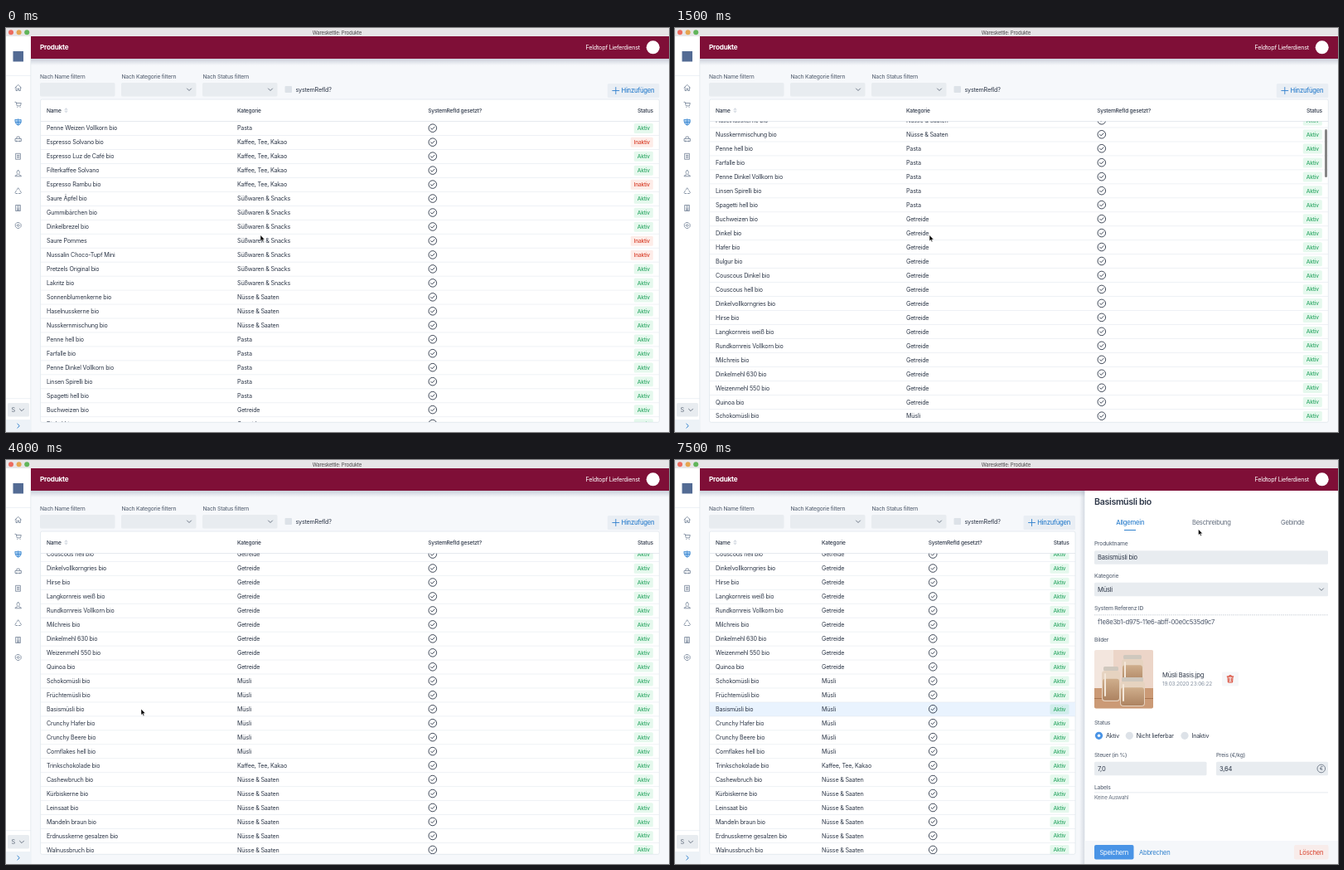
An HTML page that plays this animation: 800 px wide and 487 px high, repeating every 8000 ms.

```html
<!DOCTYPE html>
<html lang="de">
<head>
<meta charset="utf-8">
<title>Produkte</title>
<style>
html, body { margin: 0; width: 100%; height: 100%; overflow: hidden; background: #f6f8fb; }
svg { display: block; }
text { font-family: Inter, "Open Sans", sans-serif; letter-spacing: -.03em; white-space: pre; }
</style>
</head>
<body>
<svg id="stage" width="800" height="487" viewBox="0 0 800 487"></svg>
<script>
const INK = '#2d3748', GREY = '#606b7b', BLUE = '#3182ce', FIELD = '#e8ecf0', RED = '#d8402c';
const PITCH = 16.97, FIRST = 120.9, SELECTED = 36;

const groups = [
  ['Pasta', 'Penne Weizen Vollkorn bio'],
  ['Kaffee, Tee, Kakao', 'Espresso Solvano bio|Espresso Luz de Café bio|Filterkaffee Solvano|Espresso Rambu bio'],
  ['Süßwaren & Snacks', 'Saure Äpfel bio|Gummibärchen bio|Dinkelbrezel bio|Saure Pommes|Nussalin Choco-Tupf Mini|Pretzels Original bio|Lakritz bio'],
  ['Nüsse & Saaten', 'Sonnenblumenkerne bio|Haselnusskerne bio|Nusskernmischung bio'],
  ['Pasta', 'Penne hell bio|Farfalle bio|Penne Dinkel Vollkorn bio|Linsen Spirelli bio|Spagetti hell bio'],
  ['Getreide', 'Buchweizen bio|Dinkel bio|Hafer bio|Bulgur bio|Couscous Dinkel bio|Couscous hell bio|Dinkelvollkorngries bio|Hirse bio|Langkornreis weiß bio|Rundkornreis Vollkorn bio|Milchreis bio|Dinkelmehl 630 bio|Weizenmehl 550 bio|Quinoa bio'],
  ['Müsli', 'Schokomüsli bio|Früchtemüsli bio|Basismüsli bio|Crunchy Hafer bio|Crunchy Beere bio|Cornflakes hell bio'],
  ['Kaffee, Tee, Kakao', 'Trinkschokolade bio'],
  ['Nüsse & Saaten', 'Cashewbruch bio|Kürbiskerne bio|Leinsaat bio|Mandeln braun bio|Erdnusskerne gesalzen bio|Walnussbruch bio'],
];
const products = groups.flatMap(([category, names]) => names.split('|').map(name => ({ name, category })));
const inactive = [1, 4, 8, 9];

// One state per half second
const scrolls = [0, 50, 153.6, 230, 283.3, 312.2, 431.4];
const pointer = { 0: [307, 249.7], 7: [173, 292.5], 8: [163, 300.3], 12: [186, 300.3], 13: [426.5, 251], 14: [574.5, 116], 15: [631.5, 83.5] };

const text = (s, x, y, size = 7.2, fill = INK, weight = 400, anchor = 'start') =>
  `<text x="${x}" y="${y + size * .36}" font-size="${size}" fill="${fill}" font-weight="${weight}" text-anchor="${anchor}">${s.replace('&', '&amp;')}</text>`;
const rect = (x, y, w, h, fill, r = 0, extra = '') =>
  `<rect x="${x}" y="${y}" width="${w}" height="${h}" fill="${fill}" rx="${r}" ${extra}/>`;
const circle = (x, y, r, fill, extra = '') => `<circle cx="${x}" cy="${y}" r="${r}" fill="${fill}" ${extra}/>`;
const icon = (x, y, d, stroke = GREY, width = .8, fill = 'none') =>
  `<path transform="translate(${x} ${y})" d="${d}" fill="${fill}" stroke="${stroke}" stroke-width="${width}" stroke-linecap="round" stroke-linejoin="round"/>`;
const chevron = (x, y) => icon(x, y, 'M-2.5-1.2 0 1.3 2.5-1.2', GREY, .9);
const label = (s, x, y) => text(s, x, y, 6.7, GREY, 500);
const field = (x, y, w, h = 16.5) => rect(x, y, w, h, FIELD, 1.5);

function sidebar() {
  const icons = [
    [72, 'M-3.7 0 0-3.6 3.7 0M-2.7-.7V3.5H-.8V1H.8V3.5H2.7V-.7'],
    [92.5, 'M-3.8-3.2H-2.5L-1.4 1.4H2.7L3.6-2H-2.2M-1 3.1h.2M2.3 3.1h.2'],
    [113.5, 'M-3.5-3Q-1.5-2.6 0-3.6 1.5-2.6 3.5-3V0Q3 2.6 0 3.8-3 2.6-3.5 0ZM-3 0H3M0-3V3'],
    [134, 'M-3.7 2V-.5H-2.3L-1.4-3H1.4L2.3-.5H3.7V2ZM-2-.5H2M-2 2v1M2 2v1'],
    [154.8, 'M-2.7-3.5H2.7V3.5H-2.7ZM-1.3-1.5H1.3M-1.3 0H1.3M-1.3 1.5H1.3'],
    [175.3, 'M0-3.6C2.4-3.6 1.8 0 .8.6V1.5L3.6 2.7V3.5H-3.6V2.7L-.8 1.5V.6C-1.8 0-2.4-3.6 0-3.6Z'],
    [196.3, 'M-1.4-1.6 0-3.6 1.6-1.2M2.4 0 3.7 2.2 2.8 3.2H.6M-1 3.2H-3L-3.7 2.2-2.2-.4'],
    [217, 'M-2.7-3.5H2.7V3.5H-2.7ZM-1.3-2H1.3M-1.3 0H1.3M-1.3 1.2H1.3M-1.3 2.4H1.3'],
    [238, 'M-1.3-3.4H1.3L3.4-1.3V1.3L1.3 3.4H-1.3L-3.4 1.3V-1.3ZM-1.3 0A1.3 1.3 0 1 0 1.3 0 1.3 1.3 0 1 0-1.3 0'],
  ];
  return rect(0, 10, 30, 477, '#fff') + rect(29.5, 37, .7, 450, '#dde3ea')
    + rect(8.5, 28, 12.5, 12.5, '#536b94')
    + rect(0, 57, 30, .6, '#e2e8f0') + rect(0, 446.5, 30, .6, '#e2e8f0')
    + icons.map(([y, d], i) => icon(14.7, y, d, i === 2 ? BLUE : '#718096', .8, i === 2 ? '#a9cdf0' : 'none')).join('')
    + rect(2, 452, 26, 16.5, FIELD, 1.5) + text('S', 6.5, 460.4, 7.2, GREY) + chevron(19, 460.4)
    + rect(0, 472, 30, 15, '#edf2f7') + icon(15, 479.6, 'M-1.2-2.4 1.3 0-1.2 2.4', BLUE, 1);
}

function header() {
  return rect(0, 0, 800, 10, '#e7e5e7')
    + ['#ed6a5e', '#e5a550', '#61b55a'].map((c, i) => circle(6 + i * 9.6, 5.2, 3, c)).join('')
    + text('Wareskettle: Produkte', 399.5, 5.4, 6.1, '#4a484a', 400, 'middle')
    + rect(30, 10, 770, 27, '#7f0f37')
    + text('Produkte', 41, 23.3, 8.2, '#fff', 700)
    + text('Feldtopf Lieferdienst', 765, 23.6, 7.2, '#fff', 400, 'end') + circle(780.7, 23.3, 8, '#fff');
}

function filters(right) {
  return label('Nach Name filtern', 41, 58.8) + label('Nach Kategorie filtern', 139.5, 58.8) + label('Nach Status filtern', 237.5, 58.8)
    + field(41, 66, 90.5) + field(139, 66, 90.5) + field(237, 66, 90.5)
    + chevron(221, 74.2) + chevron(319, 74.2)
    + rect(336.5, 70, 8.5, 8, '#dde2e8', 1) + text('systemRefId?', 349.5, 74.2)
    + rect(right - 62.5, 67, 62.5, 17, '#e9eef4', 1.5)
    + icon(right - 52.5, 75.5, 'M-4 0H4M0-4V4', BLUE, .9)
    + text('Hinzufügen', right - 45.8, 75.5, 7.6, BLUE, 500);
}

function row(i, y, cols, right) {
  const off = inactive.includes(i), width = off ? 27 : 23;
  return (y > 104 && y < 484) ? rect(42, y + 8.2, right - 42, .6, '#e3e8ee')
    + text(products[i].name, 49, y) + text(products[i].category, cols[0], y)
    + circle(cols[1] + 5.5, y - .2, 4.8, 'none', `stroke="${INK}" stroke-width=".9"`)
    + icon(cols[1] + 5.5, y - .2, 'M-2.1.1-.6 1.6 2.2-1.4', INK, .9)
    + rect(right - 7.5 - width, y - 6, width, 12, off ? '#ee6040' : '#2bc46f', 1.5, 'fill-opacity=".12"')
    + text(off ? 'Inaktiv' : 'Aktiv', right - 7.5 - width / 2, y, 6.5, off ? RED : '#2fa866', 500, 'middle') : '';
}

function table(right, cols, scroll, selected, bar) {
  const head = (s, x, anchor) => text(s, x, 99.4, 6.6, INK, 500, anchor);
  const at = i => FIRST + i * PITCH - scroll;
  return rect(41.5, 86, right - 41.5, 389.3, '#fff', 2, 'stroke="#e0e6ed" stroke-width=".8"')
    + head('Name', 49) + head('Kategorie', cols[0]) + head('SystemRefId gesetzt?', cols[1]) + head('Status', right - 7.5, 'end')
    + icon(72.5, 99.3, 'M-1.5-1 0-2.8 1.5-1ZM-1.5 1 0 2.8 1.5 1Z', '#c3cad4', .4, '#d5dbe3')
    + '<g clip-path="url(#rows)">'
    + (selected ? rect(42, at(SELECTED) - 8.5, right - 42, 17, '#e9f3fe') : '')
    + products.map((_, i) => row(i, at(i), cols, right)).join('') + '</g>'
    + rect(42, 112, right - 42, .7, '#dbe1e8')
    + (bar ? rect(784, 86.3 + scroll * .155, 3, 58, '#858585', 1.5) : '');
}

function jar(x, y, w, h) {
  return rect(x, y + 5, w, h - 5, '#e6d3c0', 4) + rect(x + 1, y + h * .35, w - 2, h * .62, 'url(#grain)', 3)
    + rect(x + 2, y, w - 4, 5, '#cfc8be', 1.5) + rect(x + 3, y + 8, 2, h - 14, '#f3e7da', 1);
}

function panel() {
  const radio = (x, s, on) => circle(x, 332.3, 4.6, on ? '#4a94e6' : '#dde2e8') + (on ? circle(x, 332.3, 1.7, '#fff') : '')
    + text(s, x + 8.5, 332.3);
  return rect(488, 37, 6.5, 450, 'url(#edge)') + rect(494.5, 37, 306, 450, '#fff')
    + text('Basismüsli bio', 506, 50.5, 10.6, INK, 600)
    + text('Allgemein', 549.3, 75.2, 7.6, BLUE, 500, 'middle') + rect(542, 84, 14, 1, BLUE)
    + text('Beschreibung', 647.3, 75.2, 7.6, GREY, 400, 'middle') + text('Gebinde', 745.3, 75.2, 7.6, GREY, 400, 'middle')
    + label('Produktname', 506, 101) + field(506, 109.2, 282) + text('Basismüsli bio', 510, 117.6, 7.6)
    + label('Kategorie', 506, 139.7) + field(506, 147.8, 282) + text('Müsli', 510, 156.2, 7.6) + chevron(780, 156)
    + label('System Referenz ID', 506, 178.3)
    + '<path d="M506 186.8H788" stroke="#b9c1cc" stroke-width=".7" stroke-dasharray="1.5 1"/>'
    + text('f1e8e3b1-d975-11e6-abff-00e0c535d9c7', 510, 195, 7.7, '#4a5568')
    + label('Bilder', 506, 217)
    + '<g clip-path="url(#photo)">' + rect(506, 229, 71, 70.5, '#f3e6de') + rect(529, 229, 48, 48, '#ecd5c8')
    + rect(506, 275, 71, 25, '#cb9a76') + rect(506, 287, 71, 1, '#a8744f')
    + jar(539, 235, 26, 35) + jar(515, 249, 22, 42) + jar(537, 262, 30, 35) + '</g>'
    + text('Müsli Basis.jpg', 588, 259, 7.6) + text('19.03.2020 23:06:22', 588, 270, 6.5, '#8490a0')
    + rect(660, 255.5, 20, 17, '#f6f7f9', 1.5)
    + icon(670, 264, 'M-3.8-3H3.8M-1.2-3V-4.2H1.2V-3M-3-2.8-2.6 4H2.6L3-2.8M-1.2-1V2.5M1.2-1V2.5', RED, 1)
    + label('Status', 506, 317) + radio(511.5, 'Aktiv', true) + radio(548.3, 'Nicht lieferbar') + radio(615, 'Inaktiv')
    + label('Steuer (in %)', 506, 356) + field(506, 363.8, 135.5) + text('7,0', 510, 372, 7.6)
    + label('Preis (€/kg)', 653, 356) + field(653, 363.8, 135) + text('3,64', 657, 372, 7.6)
    + circle(779.8, 372, 4.8, 'none', `stroke="${GREY}" stroke-width=".8"`) + text('€', 779.8, 372, 6.8, GREY, 400, 'middle')
    + label('Labels', 506, 394.5) + rect(506, 400.6, 282, .6, '#d5dbe3') + text('Keine Auswahl', 506, 406.7, 6.3, GREY)
    + rect(494.5, 459, 306, 28, '#f5f7fa')
    + rect(506, 464, 47.5, 17.5, '#4a94e6', 2) + text('Speichern', 529.7, 473, 7.6, '#fff', 400, 'middle')
    + text('Abbrechen', 560, 473, 7.6, BLUE)
    + rect(747, 464, 41.5, 17.5, '#f8ecea', 2) + text('Löschen', 767.8, 473, 7.6, RED, 400, 'middle');
}

function cursor(step) {
  const [x, y] = pointer[Math.max(...Object.keys(pointer).filter(k => k <= step))];
  return step === 14
    ? icon(x, y, 'M-1.7 0Q0 0 0 1.2V7.8M1.7 0Q0 0 0 1.2M-1.7 9Q0 9 0 7.8 0 9 1.7 9', '#222', .8)
    : icon(x, y, 'M0 0V7.1L1.6 5.6 2.7 8.1 3.9 7.6 2.8 5.2H5Z', '#fff', .5, '#000');
}

const defs = `<defs>
  <linearGradient id="shade" x2="0" y2="1"><stop stop-color="#8793a8" stop-opacity=".4"/><stop offset="1" stop-color="#8793a8" stop-opacity="0"/></linearGradient>
  <linearGradient id="edge"><stop stop-color="#8793a8" stop-opacity="0"/><stop offset="1" stop-color="#8793a8" stop-opacity=".3"/></linearGradient>
  <linearGradient id="grain" x2="0" y2="1"><stop stop-color="#cfae8c"/><stop offset="1" stop-color="#ad8361"/></linearGradient>
  <clipPath id="rows"><rect x="42" y="112" width="746" height="363"/></clipPath>
  <clipPath id="photo"><rect x="506" y="229" width="71" height="70.5" rx="2"/></clipPath></defs>`;
const stage = document.getElementById('stage');
let shown = -1;

function draw() {
  const step = Math.floor(performance.now() % 8000 / 500);
  if (step !== shown) {
    shown = step;
    const open = step >= 11, right = open ? 483 : 788.3;
    stage.innerHTML = defs + rect(0, 0, 800, 487, '#f6f8fb') + rect(30, 37, 770, 8, 'url(#shade)')
      + filters(right)
      + table(right, open ? [177, 305.7] : [279, 509.3], scrolls[Math.min(step, 6)], step >= 10, step > 0 && step < 8)
      + (open ? panel() : '') + sidebar() + header() + cursor(step);
  }
  requestAnimationFrame(draw);
}
draw();
</script>
</body>
</html>
```
